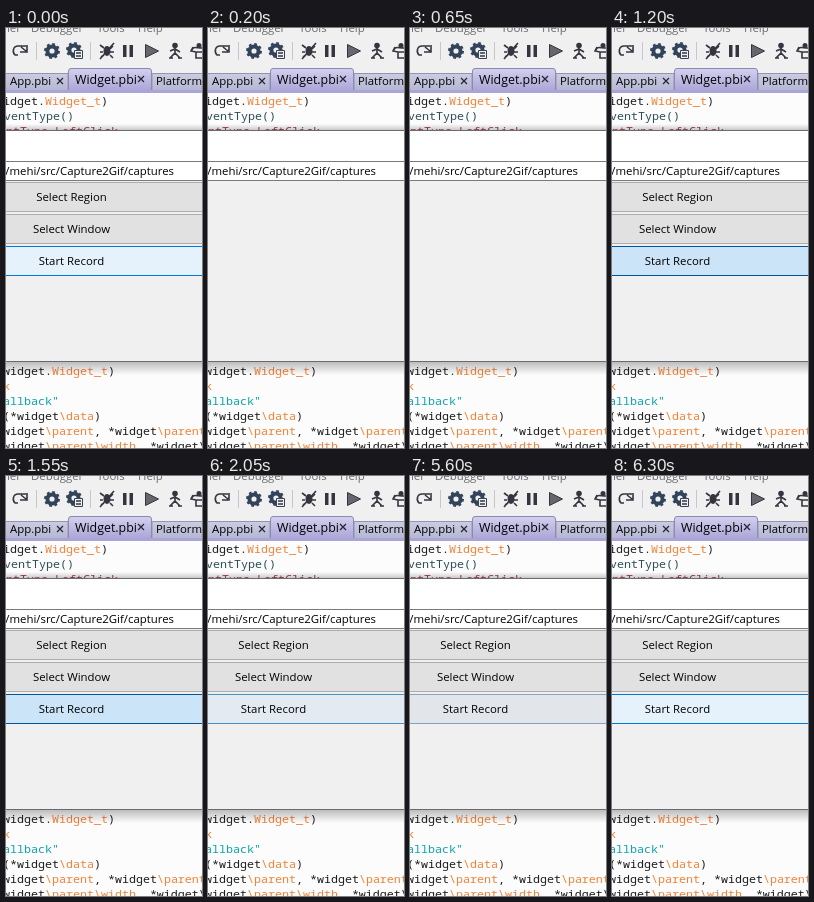
Write an HTML page that moves like this. It is 196 px wide and 420 px high and loops after 8000 ms.

```html
<!DOCTYPE html>
<html lang="en">
<head>
<meta charset="utf-8">
<title>Recorder window</title>
<style>
html, body { margin: 0; width: 100%; height: 100%; overflow: hidden; background: #fff; }
svg { display: block; width: 196px; height: 420px; }
text { white-space: pre; }
.ui { font: 11.4px "Open Sans", "Noto Sans", sans-serif; fill: #000; }
.menu { fill: #6a6a6e; }
.active { font-size: 12.4px; }
.code { font: 11.67px "Noto Sans Mono", "DejaVu Sans Mono", monospace; fill: #1c1c1c; }
.type { fill: #f08236; }
.string { fill: #0aa5a8; }
.call { fill: #2c4d58; }
.constant { fill: #a04050; }
.label { text-anchor: middle; }
.button { fill: #e1e1e1; stroke: #adadad; }
.icon { fill: none; stroke: #35353f; stroke-width: 1.6; }
.solid { fill: #35353f; stroke: none; }
.gear { fill: none; stroke: #33435a; }
.close { fill: none; stroke: #26263a; stroke-width: 1.3; }
.buttons { animation: show 8s step-end infinite; }
.record { animation: state 8s step-end infinite; }

@keyframes show {
  0% { visibility: visible; }
  .625% { visibility: hidden; }
  11.25%, 100% { visibility: visible; }
}
/* pressed, then hover fading in and out */
@keyframes state {
  0% { fill: #e5f1fb; stroke: #0078d7; }
  11.25% { fill: #cce4f7; stroke: #005499; }
  21.875% { fill: #d4e8f8; stroke: #0060ae; }
  22.5% { fill: #ddedfa; stroke: #006cc2; }
  23.125% { fill: #e5f1fb; stroke: #0078d7; }
  25% { fill: #e4eef7; stroke: #2585cd; }
  25.625% { fill: #e3eaf2; stroke: #4a92c4; }
  26.875% { fill: #e2e5e9; stroke: #86a2b7; }
  27.5% { fill: #e1e1e1; stroke: #adadad; }
  29.375% { fill: #e3e8ed; stroke: #7aa0bd; }
  30% { fill: #e5f1fb; stroke: #0078d7; }
  38.125% { fill: #e3e8ed; stroke: #7aa0bd; }
  38.75% { fill: #e1e1e1; stroke: #adadad; }
  70% { fill: #e2e6ea; stroke: #86a3b9; }
  70.625% { fill: #e1e1e1; stroke: #adadad; }
  78.125% { fill: #e3e9ee; stroke: #7aa0bd; }
  78.75%, 100% { fill: #e5f1fb; stroke: #0078d7; }
}
</style>
</head>
<body>
<svg viewBox="0 0 196 420" xmlns="http://www.w3.org/2000/svg">
  <defs>
    <linearGradient id="above" x1="0" y1="0" x2="0" y2="1">
      <stop offset="0" stop-opacity="0"/><stop offset="1" stop-opacity=".2"/>
    </linearGradient>
    <linearGradient id="below" x1="0" y1="0" x2="0" y2="1">
      <stop offset="0" stop-opacity=".25"/><stop offset="1" stop-opacity="0"/>
    </linearGradient>
    <linearGradient id="tab" x1="0" y1="0" x2="0" y2="1">
      <stop offset="0" stop-color="#d3d0ee"/><stop offset="1" stop-color="#aaa5d6"/>
    </linearGradient>
    <linearGradient id="idle" x1="0" y1="0" x2="0" y2="1">
      <stop offset="0" stop-color="#cccde2"/><stop offset="1" stop-color="#b4b5d2"/>
    </linearGradient>
    <g id="gear" class="gear">
      <circle r="4.600" stroke-width="4"/>
      <circle r="7" stroke-width="2" stroke-dasharray="2.75"/>
    </g>
    <path id="close" class="close" d="M-3-3 3 3M3-3-3 3"/>
  </defs>

  <rect width="196" height="420" fill="#fcfcfc"/>

  <!-- menu and toolbar -->
  <rect width="196" height="40" fill="#f0f0f0"/>
  <g class="ui">
    <text class="menu" x="-2" y="4">iler</text>
    <text class="menu" x="25" y="4">Debugger</text>
    <text class="menu" x="91" y="4">Tools</text>
    <text class="menu" x="132" y="4">Help</text>
  </g>
  <path d="M30.500 14V32M84.500 14V32" stroke="#c6c6cc"/>
  <path class="icon" d="M12 27H9C6 24 7 18 12 18H20M21 17V24H14M15 19 20 23"/>
  <use href="#gear" x="46" y="23"/>
  <use href="#gear" x="68" y="22"/>
  <path d="M68.500 22.500H76.500V30.500H68.500Z" fill="#f0f0f0" stroke="#33435a"/>
  <path class="icon" d="M70 25H75M70 28H75" stroke-width="1"/>
  <ellipse class="solid" cx="101" cy="23" rx="3.500" ry="5"/>
  <path class="icon" d="M94 17 98 20M94 24H97M95 29 98 27M107 18 104 21M108 24H104M107 30 104 27M94 31 108 15"/>
  <path class="solid" d="M117 17h3.500v12H117zM123.500 17h3.500v12h-3.500z"/>
  <path d="M139.500 16.500V29.500L152.500 23Z" fill="#66666c" stroke="#35353f"/>
  <circle class="solid" cx="169" cy="17.500" r="2.800"/>
  <path class="icon" d="M169 19V26M164 23 169 21 174 24M164 30 169 25 174 30M163 30H167M172 30H176"/>
  <circle class="solid" cx="193" cy="17.500" r="2.500"/>
  <path class="icon" d="M186 22C187 18 190 20 196 20M187 19 185 23 190 24M196 24H190V30H196"/>

  <!-- file tabs -->
  <rect y="39" width="196" height="25" fill="#f0f0f0"/>
  <path d="M-5 45.500H62V63H-5ZM146 45.500H201V63H146Z" fill="url(#idle)" stroke="#9494ae"/>
  <path d="M62.500 63V43Q62.500 40.500 65 40.500H143Q145.500 40.500 145.500 43V63Z" fill="url(#tab)" stroke="#8c89b4"/>
  <rect y="62" width="196" height="3" fill="#aaa5d6"/>
  <g class="ui">
    <text x="4" y="57">App.pbi</text>
    <text class="active" x="69" y="56">Widget.pbi</text>
    <text x="150" y="57">Platform</text>
  </g>
  <use href="#close" x="54" y="53"/>
  <use href="#close" x="135" y="51"/>

  <!-- code -->
  <g class="code">
    <text x="-3" y="77">idget.<tspan class="type">Widget_t</tspan>)</text>
    <text class="call" x="-2" y="92">ventType()</text>
    <text class="constant" x="-7" y="107">entType_LeftClick</text>
    <text x="-3" y="347">widget.<tspan class="type">Widget_t</tspan>)</text>
    <text x="-3" y="362"><tspan class="type">k</tspan></text>
    <text x="-3" y="377"><tspan class="string">allback"</tspan></text>
    <text x="-3" y="392">(*widget<tspan class="type">\data</tspan>)</text>
    <text x="-3" y="407">widget<tspan class="type">\parent</tspan>, *widget<tspan class="type">\parent</tspan></text>
    <text x="-3" y="422">widget<tspan class="type">\parent\width</tspan>, *widget\</text>
  </g>

  <!-- recorder window -->
  <rect y="96" width="196" height="6" fill="url(#above)"/>
  <rect y="334" width="196" height="13" fill="url(#below)"/>
  <rect y="102" width="196" height="232" fill="#6b6b6b"/>
  <rect y="103" width="196" height="30" fill="#fff"/>
  <rect y="133" width="196" height="200" fill="#f0f0f0"/>
  <rect x="-5" y="133.500" width="206" height="19" fill="#fff" stroke="#7a7a7a"/>
  <text class="ui" x="168" y="147" text-anchor="end">/mehi/src/Capture2Gif/captures</text>
  <g class="buttons">
    <rect class="button" x="-65" y="154.500" width="266" height="29"/>
    <rect class="button" x="-65" y="186.500" width="266" height="29"/>
    <rect class="button record" x="-65" y="218.500" width="266" height="29"/>
    <g class="ui label">
      <text x="65.500" y="173">Select Region</text>
      <text x="65.500" y="205">Select Window</text>
      <text x="65.500" y="237">Start Record</text>
    </g>
  </g>
</svg>
</body>
</html>
```
